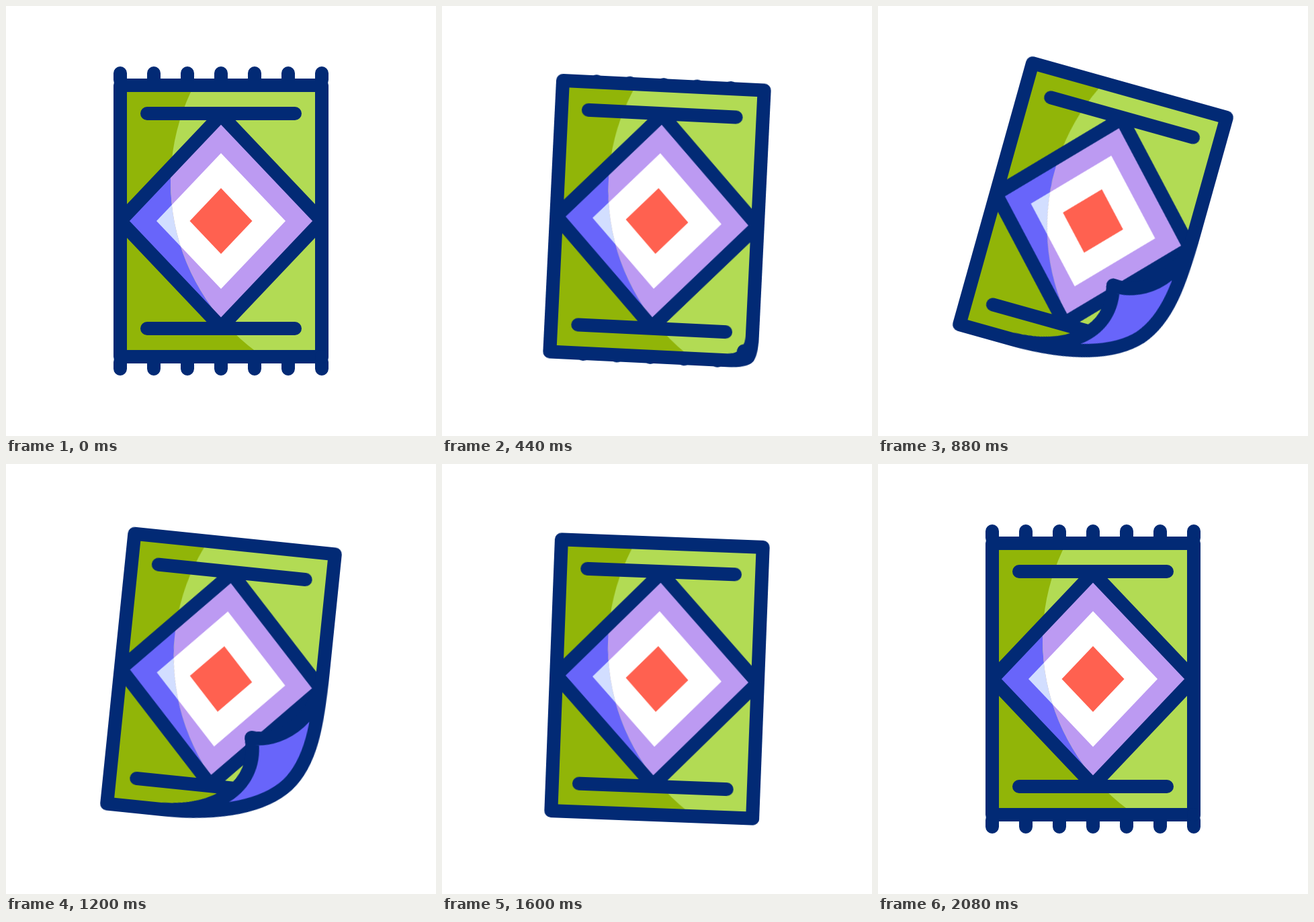
Recreate the animation shown at these times as an HTML page without scripts. Size 640 px wide and 640 px high, loop 2.2 s.

```html
<!DOCTYPE html>
<html lang="en">
<head>
<meta charset="utf-8">
<title>Rug</title>
<style>
html, body { margin: 0; width: 100%; height: 100%; overflow: hidden; background: #fff; }
svg { display: block; width: 100vw; height: 100vh; }
.line { fill: none; stroke: #022a75; stroke-width: 20; stroke-linecap: round; stroke-linejoin: round; }
.fold { fill: #6865fa; }
.rug, .mid, .end, .front, .fold { animation: 2200ms linear infinite; }
.rug { animation-name: swing; }
.mid { animation-name: mid; }
.end { animation-name: end; }
.front { animation-name: front; }
.fold { animation-name: fold; }

@keyframes swing {
  0%, 9.09% { transform: rotate(0deg); animation-timing-function: ease-in-out; }
  48.3% { transform: rotate(17.2deg); animation-timing-function: ease-in-out; }
  61.59% { transform: rotate(-7.8deg); animation-timing-function: ease-in-out; }
  74.55% { transform: rotate(2.6deg); animation-timing-function: ease-in-out; }
  86.8%, 100% { transform: rotate(0deg); }
}

/* fringe slides under the border, then hides while the corner curls */
@keyframes mid {
  0%, 5.45% { transform: translateY(0); opacity: 1; animation-timing-function: cubic-bezier(.42, 0, .8, .8); }
  20.9% { transform: translateY(18px); opacity: 1; }
  20.91%, 77.26% { transform: translateY(18px); opacity: 0; }
  77.27% { transform: translateY(18px); opacity: 1; animation-timing-function: ease-in-out; }
  94.55%, 100% { transform: translateY(0); opacity: 1; }
}
@keyframes end {
  0%, 5.45% { transform: translateY(0); opacity: 1; animation-timing-function: ease-in-out; }
  15.45% { transform: translateY(18px); opacity: 1; }
  15.46%, 83.6% { transform: translateY(18px); opacity: 0; }
  83.61% { transform: translateY(18px); opacity: 1; animation-timing-function: ease-in-out; }
  94.55%, 100% { transform: translateY(0); opacity: 1; }
}

/* visible face of the rug */
@keyframes front {
  0%, 15.45% {
    d: path("M-150 -202L150 -202L150 202C150 202 150 202 150 202C150 202 150 202 150 202L-150 202Z");
    animation-timing-function: cubic-bezier(.35, 0, .7, .7);
  }
  29.09% {
    d: path("M-150 -202L150 -202L150 0C150 85 116 124 86 121C92 170 30 200 -45 202L-150 202Z");
    animation-timing-function: cubic-bezier(.3, .5, .6, 1);
  }
  48.18% {
    d: path("M-150 -202L150 -202L150 -30C150 50 85 80 47 75C70 150 10 200 -75 202L-150 202Z");
    animation-timing-function: cubic-bezier(.5, 0, .8, .6);
  }
  60% {
    d: path("M-150 -202L150 -202L150 -15C150 62 102 104 73 102C82 160 25 200 -55 202L-150 202Z");
    animation-timing-function: cubic-bezier(.3, .3, .6, 1);
  }
  70.9%, 100% {
    d: path("M-150 -202L150 -202L150 202C150 202 150 202 150 202C150 202 150 202 150 202L-150 202Z");
  }
}

/* underside of the curled corner */
@keyframes fold {
  0%, 15.45% {
    d: path("M150 202C150 202 150 202 150 202C150 202 150 202 150 202C150 202 150 202 150 202C150 202 150 202 150 202Z");
    animation-timing-function: cubic-bezier(.35, 0, .7, .7);
  }
  29.09% {
    d: path("M150 0C150 70 146 135 124 168C104 192 40 202 -45 202C30 200 92 170 86 121C116 124 150 85 150 0Z");
    animation-timing-function: cubic-bezier(.3, .5, .6, 1);
  }
  48.18% {
    d: path("M150 -30C150 50 146 105 112 143C80 178 20 202 -75 202C10 200 70 150 47 75C85 80 150 50 150 -30Z");
    animation-timing-function: cubic-bezier(.5, 0, .8, .6);
  }
  60% {
    d: path("M150 -15C150 60 147 122 121 157C95 188 30 202 -55 202C25 200 82 160 73 102C102 104 150 62 150 -15Z");
    animation-timing-function: cubic-bezier(.3, .3, .6, 1);
  }
  70.9%, 100% {
    d: path("M150 202C150 202 150 202 150 202C150 202 150 202 150 202C150 202 150 202 150 202C150 202 150 202 150 202Z");
  }
}
</style>
</head>
<body>
<svg viewBox="-320 -320 640 640">
  <defs>
    <clipPath id="face">
      <path class="front" d="M-150 -202L150 -202L150 202C150 202 150 202 150 202C150 202 150 202 150 202L-150 202Z"/>
    </clipPath>
    <clipPath id="lit"><circle cx="239" cy="-58" r="314"/></clipPath>
  </defs>

  <g class="rug">
    <g class="line">
      <path class="mid" d="M-100 -220v10M-50 -220v10M0 -220v10M50 -220v10M100 -220v10"/>
      <path class="end" d="M-150 -220v10M150 -220v10"/>
      <g transform="scale(1 -1)">
        <path class="mid" d="M-100 -220v10M-50 -220v10M0 -220v10M50 -220v10M100 -220v10"/>
        <path class="end" d="M-150 -220v10M150 -220v10"/>
      </g>
    </g>

    <g clip-path="url(#face)">
      <path fill="#91b508" d="M-150 -202H150V202H-150Z"/>
      <path fill="#6865fa" d="M0 -158L150 0L0 158L-150 0Z"/>
      <path fill="#d2deff" d="M0 -101L96 0L0 101L-96 0Z"/>
      <g clip-path="url(#lit)">
        <path fill="#b2db54" d="M-150 -202H150V202H-150Z"/>
        <path fill="#bc9af2" d="M0 -158L150 0L0 158L-150 0Z"/>
        <path fill="#fff" d="M0 -101L96 0L0 101L-96 0Z"/>
      </g>
      <path fill="#ff6150" d="M0 -49L46.5 0L0 49L-46.5 0Z"/>
      <path class="line" d="M0 -158L150 0L0 158L-150 0ZM-110 -160H110M-110 160H110"/>
    </g>

    <path class="line front" d="M-150 -202L150 -202L150 202C150 202 150 202 150 202C150 202 150 202 150 202L-150 202Z"/>
    <path class="line fold" d="M150 202C150 202 150 202 150 202C150 202 150 202 150 202C150 202 150 202 150 202C150 202 150 202 150 202Z"/>
  </g>
</svg>
</body>
</html>
```
